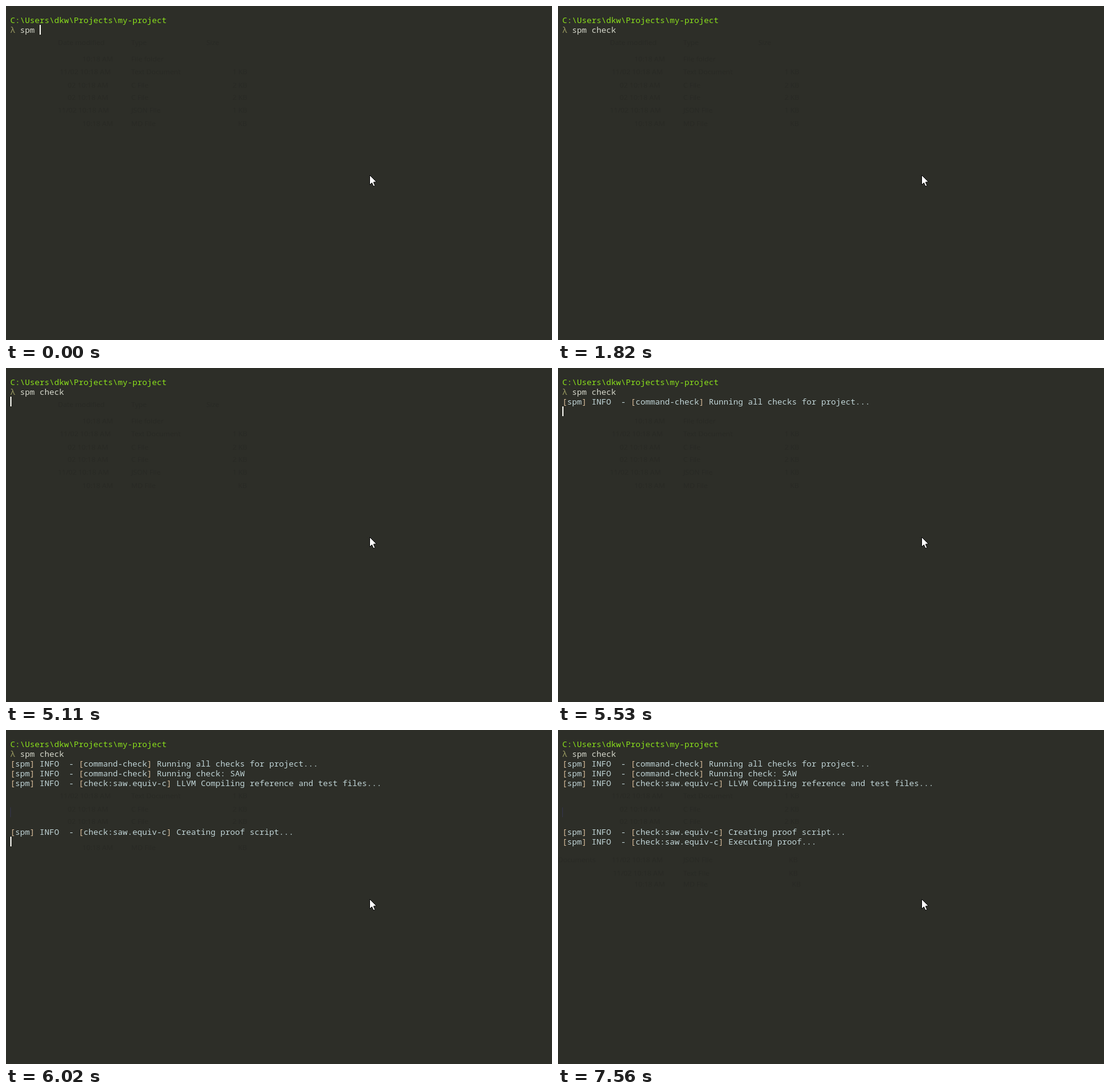
An HTML page with a canvas for the animation above (8000 ms loop, 894 by 548 pixels).

```html
<!DOCTYPE html>
<html lang="en">
<head>
<meta charset="utf-8">
<title>Terminal</title>
<style>
  html, body { margin: 0; width: 100%; height: 100%; overflow: hidden; background: #2d2e28; }
  canvas { display: block; width: 894px; height: 548px; }
</style>
</head>
<body>
<canvas id="stage" width="894" height="548"></canvas>
<script>
const ctx = document.getElementById('stage').getContext('2d', { alpha: false });
const LOOP = 8000, LEFT = 7, TOP = 15, CELL = 8, LINE = 16;
const BG = '#2d2e28', GREEN = '#8ae01c', LAMBDA = '#9c9c62';
const TYPED = '#d6d8cc', LOG = '#c0d4d6', BRACKET = '#dabf9c';
const MONO = '13.333px "Noto Sans Mono", "DejaVu Sans Mono", monospace';
const SMALL = '11.5px "Open Sans", "Noto Sans", sans-serif';

// Times at which each letter of the command appears
const keys = [350, 490, 560, 630, 770];

// [time, row, message]
const logs = [
  [5530, 2, '[command-check] Running all checks for project...'],
  [5670, 3, '[command-check] Running check: SAW'],
  [5740, 4, '[check:saw.equiv-c] LLVM Compiling reference and test files...'],
  [6020, 9, '[check:saw.equiv-c] Creating proof script...'],
  [6160, 10, '[check:saw.equiv-c] Executing proof...']
];

// Caret row from each time on
const caretRows = [[0, 1], [1330, 2], [5530, 3], [5670, 4], [5740, 5],
  [5880, 6], [5950, 7], [6020, 10], [6160, 11]];

const blinks = [1260, 1330, 1820, 2310, 2730, 3220, 3710, 4200, 4690, 5110,
  6580, 7070, 7560];

// Faint list behind the window: [baseline, from, until, x, text, x, text, ...]
const ghosts = [
  [64, 0, 5530, 85, 'Date modified', 205, 'Type', 328, 'Size'],
  [91, 0, 5740, 125, '10:18 AM', 205, 'File folder'],
  [112, 0, LOOP, 88, '11/02 10:18 AM', 205, 'Text Document', 371, '1 KB'],
  [134, 0, LOOP, 101, '02 10:18 AM', 205, 'C File', 371, '2 KB'],
  [154, 0, LOOP, 101, '02 10:18 AM', 205, 'C File', 371, '2 KB'],
  [175, 0, 6020, 85, '11/02 10:18 AM', 205, 'JSON File', 371, '1 KB'],
  [197, 0, 6160, 125, '10:18 AM', 205, 'MD File', 380, 'KB'],
  [217, 6860, LOOP, 0, 'Documents', 88, '11/02 10:18 AM', 205, 'JSON File', 378, 'KB'],
  [239, 6860, LOOP, 90, '11/02 10:18 AM', 205, 'Text File', 378, 'KB'],
  [257, 6860, LOOP, 125, '10:18 AM', 205, 'MD File', 383, 'KB']
];

const passed = (list, t) => list.filter(at => t >= at).length;

function write(text, row, color, col = 0) {
  ctx.font = MONO;
  [...text].forEach((ch, i) => {
    ctx.fillStyle = color === LOG && '[]'.includes(ch) ? BRACKET : color;
    ctx.fillText(ch, LEFT + (col + i) * CELL, TOP + row * LINE + 13);
  });
}

function bar(row, col, color, width = 2) {
  ctx.fillStyle = color;
  ctx.fillRect(LEFT + col * CELL, TOP + row * LINE, width, LINE);
}

function drawGhosts(t) {
  ctx.font = SMALL;
  ctx.fillStyle = '#292a25';
  for (const [y, from, until, ...cells] of ghosts) {
    if (t < from || t >= until) continue;
    for (let i = 0; i < cells.length; i += 2) ctx.fillText(cells[i + 1], cells[i], y);
  }
}

function drawPointer() {
  const points = [[0, 0], [0, 16], [3.6, 12.6], [6.2, 18.4], [8.8, 17.3], [6.3, 11.6], [11.2, 11.2]];
  ctx.beginPath();
  points.forEach(([x, y]) => ctx.lineTo(595.5 + x, 277.5 + y));
  ctx.closePath();
  ctx.fillStyle = '#fff';
  ctx.fill();
  ctx.lineWidth = 1;
  ctx.strokeStyle = '#0c0c0c';
  ctx.stroke();
}

function draw(t) {
  ctx.fillStyle = BG;
  ctx.fillRect(0, 0, 894, 548);
  drawGhosts(t);

  const typed = passed(keys, t);
  write('C:\\Users\\dkw\\Projects\\my-project', 0, GREEN);
  write('λ', 1, LAMBDA);
  write('spm ' + 'check'.slice(0, typed), 1, TYPED, 2);
  for (const [at, row, text] of logs) {
    if (t >= at) write('[spm] INFO  - ' + text, row, LOG);
  }
  if (t >= 6020) bar(7, 0, '#34344a', 1);

  const row = caretRows[passed(caretRows.map(c => c[0]), t) - 1][1];
  if (passed(blinks, t) % 2 === 0) bar(row, row === 1 ? 6 + typed : 0, '#f4f4ee');
  drawPointer();
}

const start = performance.now();
function tick() {
  draw((performance.now() - start) % LOOP);
  requestAnimationFrame(tick);
}
tick();
</script>
</body>
</html>
```
